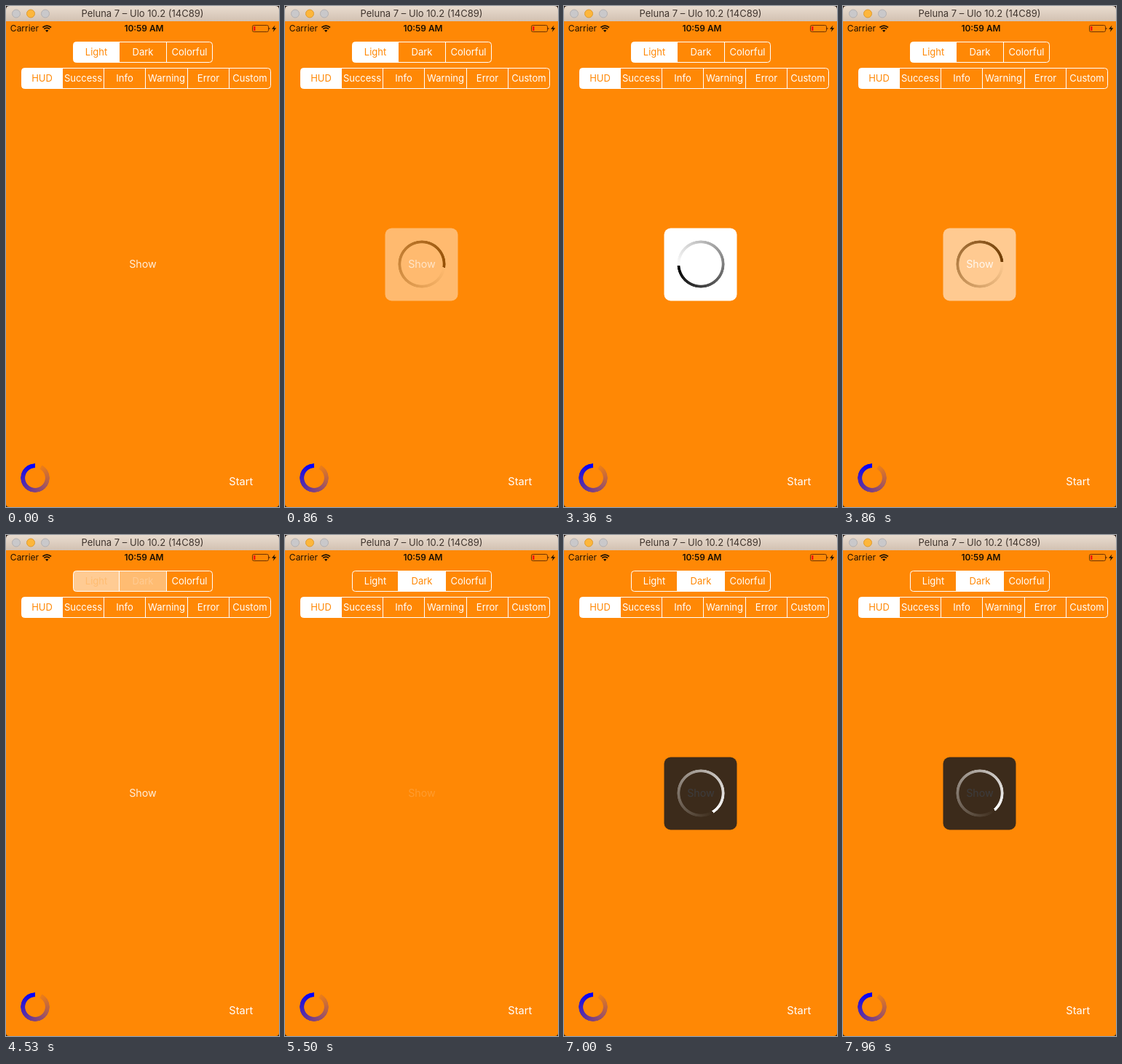
Recreate the animation shown at these times as an HTML page. Size 375 px wide and 689 px high, loop 8 s.

```html
<!DOCTYPE html>
<html lang="en">
<head>
<meta charset="utf-8">
<title>Progress HUD</title>
<style>
html, body { margin: 0; width: 100%; height: 100%; overflow: hidden; background: #2a1c14; }
svg { position: absolute; left: 0; top: 0; display: block; }
text { font-family: Inter, Roboto, sans-serif; text-anchor: middle; }
#hud {
  position: absolute; left: 137px; top: 305px; width: 100px; height: 100px;
  transform: translate(.5px, .5px); border-radius: 9px; opacity: 0;
}
.ring { position: absolute; border-radius: 50%; }
#spinner {
  left: 17px; top: 17px; width: 66px; height: 66px; transform: translate(.5px, -.5px);
  mask: radial-gradient(circle, transparent 28.3px, #000 29.1px, #000 32.2px, transparent 33px);
  -webkit-mask: radial-gradient(circle, transparent 28.3px, #000 29.1px, #000 32.2px, transparent 33px);
}
#badge {
  left: 20px; top: 629px; width: 40px; height: 40px;
  background: conic-gradient(rgba(0,0,255,0) 27deg, rgba(0,0,255,.07) 28deg, #00f 350deg);
  mask: radial-gradient(circle, transparent 13.4px, #000 14.2px, #000 19.6px, transparent 20.2px);
  -webkit-mask: radial-gradient(circle, transparent 13.4px, #000 14.2px, #000 19.6px, transparent 20.2px);
}
</style>
</head>
<body>
<svg id="stage" width="375" height="689" viewBox="0 0 375 689">
  <defs>
    <linearGradient id="bar" x2="0" y2="1">
      <stop offset="0" stop-color="#e9dccf"/>
      <stop offset="1" stop-color="#d2c1b2"/>
    </linearGradient>
  </defs>
  <path d="M0 20H375V685Q375 689 371 689H4Q0 689 0 685Z" fill="#ff8805"/>
  <path d="M0 21V5Q0 0 5 0H370Q375 0 375 5V21Z" fill="url(#bar)"/>
  <g stroke-width="1">
    <circle cx="14" cy="10.5" r="5.5" fill="#c9c8ca" stroke="#b3b0b0"/>
    <circle cx="34" cy="10.5" r="5.5" fill="#fdb63b" stroke="#dd9a30"/>
    <circle cx="54" cy="10.5" r="5.5" fill="#c9c8ca" stroke="#b3b0b0"/>
  </g>
  <text x="187.5" y="15" font-size="13" fill="#40352e">Peluna 7 – Ulo 10.2 (14C89)</text>

  <g fill="#1c1003">
    <text x="25.5" y="35.3" font-size="12">Carrier</text>
    <text x="189.5" y="35.3" font-size="11.9" font-weight="600">10:59 AM</text>
    <path d="M56.2 36L54 33.6Q56.2 31.8 58.4 33.6Z"/>
    <path d="M52.3 31.7Q56.2 28.4 60.1 31.7M50.4 29.5Q56.2 24.6 62 29.5" fill="none" stroke="#1c1003" stroke-width="1.7"/>
    <rect x="338.5" y="26.5" width="22" height="9" rx="2" fill="none" stroke="#6b3204"/>
    <path d="M361.5 29.5Q363.5 31 361.5 32.5Z"/>
    <rect x="340" y="28" width="2.5" height="6" fill="#f01810"/>
    <path d="M369.5 26.5L365 31.8H368L366.8 35.8L371.3 30.2H368.3Z"/>
  </g>

  <g id="controls"></g>
  <text id="show" x="188" y="360.3" font-size="14.3" fill="#fff">Show</text>
  <text x="322.8" y="659" font-size="14.6" fill="#fff">Start</text>
</svg>
<div id="badge" class="ring"></div>
<div id="hud"><div id="spinner" class="ring"></div></div>

<script>
const LOOP = 8000;
const ORANGE = [255, 136, 5];
const $ = id => document.getElementById(id);
const clamp = v => Math.max(0, Math.min(1, v));
const ramp = (t, start, length) => clamp((t - start) / length);
const easeInOut = p => p < .5 ? 2 * p * p : 1 - 2 * (1 - p) * (1 - p);

function add(parent, tag, attrs, label = '') {
  const node = document.createElementNS('http://www.w3.org/2000/svg', tag);
  for (const key in attrs) node.setAttribute(key, attrs[key]);
  node.textContent = label;
  parent.appendChild(node);
  return node;
}

// Fill of one segment, with rounded corners only at the ends of the control.
function segmentPath(x0, x1, y, first, last) {
  const l = first ? 4 : 0, r = last ? 4 : 0, b = y + 28;
  return `M${x0 + l} ${y}H${x1 - r}q${r} 0 ${r} ${r}V${b - r}q0 ${r} ${-r} ${r}` +
         `H${x0 + l}q${-l} 0 ${-l} ${-l}V${y + l}q0 ${-l} ${l} ${-l}Z`;
}

function segmented(labels, edges, y) {
  const group = $('controls'), end = labels.length - 1;
  const parts = labels.map((label, i) => {
    const x0 = edges[i], x1 = edges[i + 1];
    const fill = add(group, 'path', { d: segmentPath(x0, x1, y, i === 0, i === end), fill: '#fff' });
    const text = add(group, 'text', { x: (x0 + x1) / 2, y: y + 18.6, 'font-size': 13 }, label);
    if (i) add(group, 'path', { d: `M${x0} ${y}v28`, stroke: '#fff' });
    return { fill, text };
  });
  add(group, 'rect', { x: edges[0], y, width: edges[end + 1] - edges[0], height: 28, rx: 4, fill: 'none', stroke: '#fff' });
  return (index, amount) => {
    parts[index].fill.setAttribute('opacity', amount);
    const rgb = ORANGE.map(c => Math.round(255 + (c - 255) * amount));
    parts[index].text.setAttribute('fill', `rgb(${rgb})`);
  };
}

const setStyle = segmented(['Light', 'Dark', 'Colorful'], [92.5, 155.5, 220.5, 283.5], 49.5);
const setKind = segmented(['HUD', 'Success', 'Info', 'Warning', 'Error', 'Custom'],
  [21.5, 77.5, 134.5, 191.5, 249.5, 306.5, 363.5], 85.5);
for (let i = 0; i < 6; i++) setKind(i, i ? 0 : 1);
setStyle(2, 0);

function showAlpha(t) {
  const [down, up] = t < 5000 ? [500, 660] : [5500, 5600];
  if (t < down) return .86;
  return .16 + .7 * ramp(t, up, 300);
}

function draw(ms) {
  // The screen is refreshed thirty times a second.
  const t = Math.floor(Math.floor((ms + 7) * .03) * 10 / 3) * 10;
  const dark = t >= 5000;

  const swap = ramp(t, 4400, 300);
  setStyle(0, 1 - swap);
  setStyle(1, swap);
  $('show').setAttribute('opacity', showAlpha(t));

  const alpha = dark
    ? easeInOut(ramp(t, 5580, 530))
    : easeInOut(ramp(t, 630, 500)) - easeInOut(ramp(t, 3640, 470));
  const angle = dark ? 153 + (t - 6030) * .3658 : 326 + (t - 1500) * .3553;
  $('hud').style.opacity = alpha;
  $('hud').style.background = dark ? 'rgba(26,28,32,.85)' : '#fff';
  const ink = dark ? '255,255,255' : '0,0,0';
  $('spinner').style.background =
    `conic-gradient(from ${angle % 360}deg, rgba(${ink},0), rgba(${ink},1))`;
}

let start;
function tick(now) {
  if (start === undefined) start = now;
  draw((now - start) % LOOP);
  requestAnimationFrame(tick);
}
draw(0);
requestAnimationFrame(tick);
</script>
</body>
</html>
```
